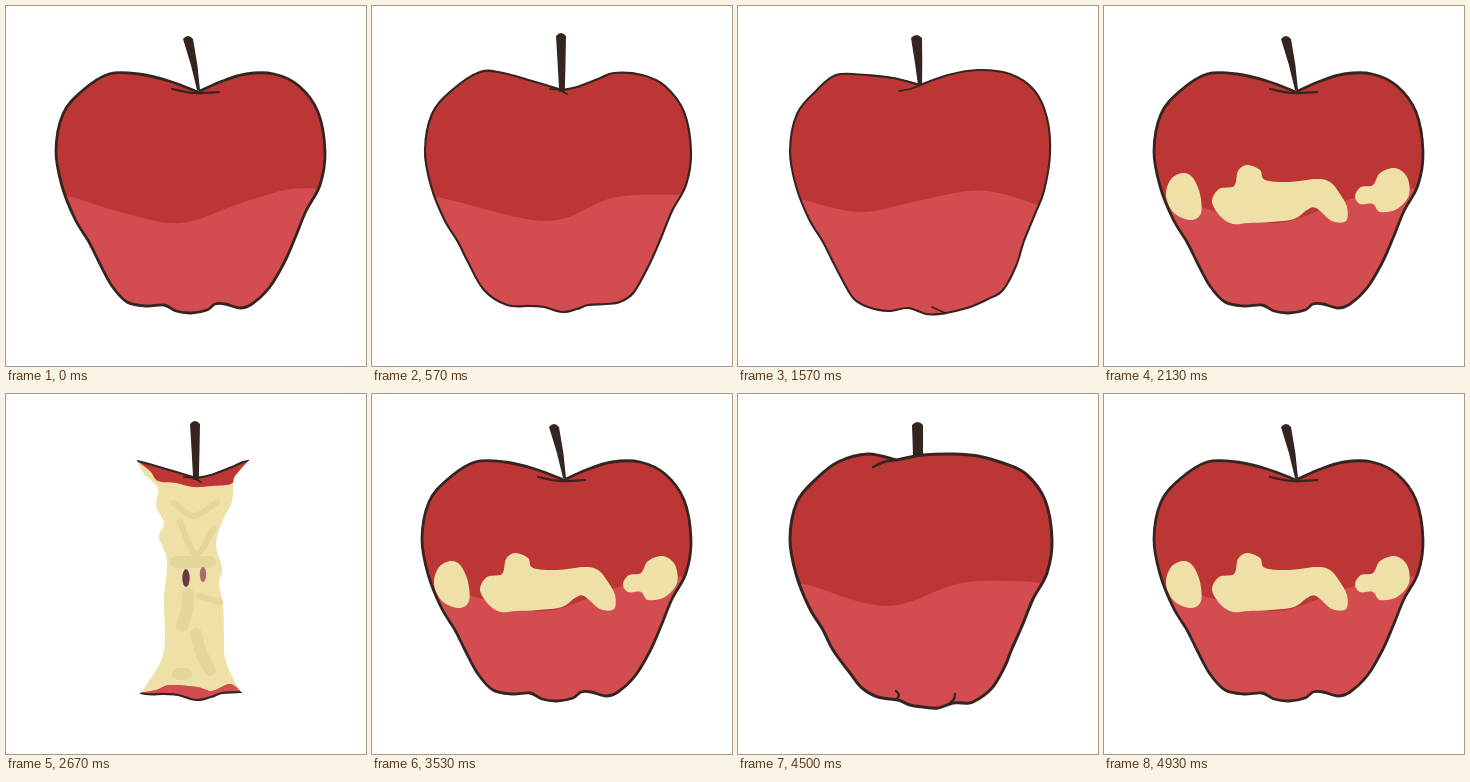
Animation of 360x360 px, one loop 5 s. Source, as an HTML page:

```html
<!DOCTYPE html>
<html lang="en">
<head>
<meta charset="utf-8">
<title>Apple</title>
<style>
html, body { margin: 0; width: 100%; height: 100%; overflow: hidden; background: #fff; }
svg { display: block; width: 100vw; height: 100vh; }
.pose { visibility: hidden; }
.pose.on { visibility: visible; }
.skin { fill: #bb3635; }
.light { fill: #d34c4f; }
.ink { fill: none; stroke: #35241f; stroke-linecap: round; stroke-linejoin: round; }
.stem { fill: #35241f; }
.flesh { fill: #efe0a7; }
.mark { fill: none; stroke: #e1d092; stroke-linecap: round; stroke-linejoin: round; }
.soft .mark { stroke: #e5d69b; }
</style>
</head>
<body>
<svg id="stage" viewBox="0 0 360 360"></svg>
<script>
const pts = s => s.split(' ').map(p => p.split(',').map(Number));
const shift = (list, dx) => list.map(([x, y]) => [x + dx, y]);

// Smooth path through points.
function curve(p, closed) {
  const n = p.length;
  const at = i => closed ? p[(i + n) % n] : p[Math.max(0, Math.min(n - 1, i))];
  const lean = (b, a, c, k) => b.map((v, j) => (v + k * (c[j] - a[j]) / 6).toFixed(2));
  let d = 'M' + p[0];
  for (let i = 0; i < (closed ? n : n - 1); i++) {
    const b = at(i), c = at(i + 1);
    d += `C${lean(b, at(i - 1), c, 1)} ${lean(c, b, at(i + 2), -1)} ${c}`;
  }
  return d + (closed ? 'Z' : '');
}
const onward = p => curve(p).replace('M', 'L');

// Uneven bite line from a to b, bowed to its left-hand side.
function ragged(ends, bow, amp, n) {
  const [a, b] = pts(ends);
  const dx = b[0] - a[0], dy = b[1] - a[1], len = Math.hypot(dx, dy);
  return Array.from({ length: n + 1 }, (_, i) => {
    const u = i / n, arch = Math.sin(Math.PI * u);
    const off = bow * arch + amp * Math.sin(i * 2.6) * Math.sqrt(Math.abs(arch));
    return [a[0] + dx * u - dy / len * off, a[1] + dy * u + dx / len * off];
  });
}

const path = (cls, d, width) =>
  `<path class="${cls}" d="${d}"${width ? ` stroke-width="${width}"` : ''}/>`;
const marks = (width, ...lines) =>
  lines.map(l => path('mark', curve(pts(l)), width)).join('');

let clips = 0;
function clipped(d, inner) {
  const id = 'clip' + clips++;
  return `<clipPath id="${id}"><path d="${d}"/></clipPath><g clip-path="url(#${id})">${inner}</g>`;
}

function stem(tip, tipW, base, baseW) {
  const [[x, y]] = pts(tip), [[u, v]] = pts(base), mid = (y + v) / 2, w = (tipW + baseW) / 2;
  const bend = x + (u - x) * .65;
  return path('stem', `M${x - tipW} ${y}Q${x} ${y - 6} ${x + tipW} ${y}` +
    `Q${bend + w} ${mid} ${u + baseW} ${v}H${u - baseW}Q${bend - w} ${mid} ${x - tipW} ${y}Z`);
}

const RIGHT = pts('293,80 312,106 319,146 314,179 300,205 289,232 278,257');
const LEFT = pts('93,256 83,236 69,213 56,180 50,145 57,108 76,85');

// Outline runs clockwise from the dip at the stem.
function apple({ from, foot, to, right = RIGHT, left = LEFT, wave, ink, lines, stalk }) {
  const body = curve([...pts(from), ...right, ...pts(foot), ...left, ...pts(to)]);
  const light = curve(pts(wave)) + 'V340H40Z';
  const skin = (inner = '') => path('skin', body) +
    clipped(body, path('light', light) + inner) + path('ink', body, ink) +
    lines.map(l => path('ink', curve(pts(l)), ink * .8)).join('');
  return { skin, stalk, dip: pts(from)[0] };
}

// What is left of an apple: two caps of skin on a ragged core.
function core(a, { top, bottom, left, right, detail }) {
  const cap = (edge, y) => `M${edge[0][0] - 1} ${y}${onward(edge)}H${edge[edge.length - 1][0] + 1}V${y}Z`;
  const flesh = curve(left) + onward([...right].reverse()) + `L${a.dip[0]} ${a.dip[1] + 3}Z`;
  return path('flesh', flesh) + detail +
    clipped(cap(top, 0) + cap(bottom, 360), a.skin()) + a.stalk;
}

const first = apple({
  from: '192,86 214,76 240,68 268,68',
  foot: '263,282 246,298 234,302 219,298 209,298 201,304 185,307 170,305 158,299 140,300 121,296 106,280',
  to: '103,68 133,68 163,75 192,86',
  wave: '40,188 62,190 118,207 175,217 235,197 285,183 330,184',
  ink: 2.8,
  lines: ['166,83 188,87 213,86'],
  stalk: stem('182,33', 5, '192.5,84', 1.5)
});

const second = apple({
  from: '182,79 210,69 240,64 272,68',
  right: pts('296,84 309,112 312,148 306,185 297,208 286,235 278,260'),
  foot: '265,284 250,293 232,301 213,306 202,308 188,308 170,302 150,305 130,301 116,293 106,277',
  left: shift(LEFT, 2),
  to: '98,69 128,69 155,72 182,79',
  wave: '40,186 66,194 122,206 175,196 230,185 265,188 300,199 330,206',
  ink: 2.1,
  lines: ['161,85 172,83 183,79', '128,69 155,72 182,79', '194,301 207,307'],
  stalk: stem('178.5,32', 5.5, '182,79', 2)
});

const third = apple({
  from: '158,66 185,61 215,60 240,62 265,69',
  right: shift(RIGHT, -5),
  foot: '267,272 254,294 235,308 225,309 215,309 200,314 185,313 172,311 160,306 140,303 124,294 112,279',
  left: shift(LEFT, 2),
  to: '100,68 130,60 158,66',
  wave: '40,188 70,191 150,212 230,188 330,190',
  ink: 3,
  lines: ['135,73 146,68 158,66', '158,297 161,301 158,306', '217,300 216,305 212,309'],
  stalk: stem('179.5,31', 5.5, '180,62', 5)
});

const fourth = apple({
  from: '184,82 206,74 240,67 270,70',
  right: shift(RIGHT, -2),
  foot: '268,276 252,298 230,306 206,307 195,310 180,310 168,307 150,304 128,302 110,284',
  left: shift(LEFT, 3),
  to: '104,70 130,67 160,74 184,82',
  wave: '40,190 70,193 165,212 240,190 330,190',
  ink: 2.4,
  lines: ['168,84 180,86 190,82'],
  stalk: stem('183,32', 5, '185,83', 2)
});

const fifth = apple({
  from: '190,84 205,81 226,73 242,67 270,69',
  foot: '262,286 248,296 234,298 216,299 205,303 190,306 172,301 158,300 135,299 112,284',
  left: shift(LEFT, 3),
  to: '108,66 131,67 160,75 190,84',
  wave: '40,190 70,192 175,215 245,191 330,189',
  ink: 2.2,
  lines: ['178,83 187,84 195,88'],
  stalk: stem('189,30', 5, '190,86', 2.8)
});

const nibbles = [
  '62,186 68,172 80,167 89,172 96,188 97,207 88,214 74,210 65,200',
  '108,196 115,183 130,180 134,165 143,159 156,164 161,174 185,176 212,173 226,176 236,188 243,201 242,215 228,215 212,202 203,204 190,213 166,216 144,217 129,218 117,211',
  '251,190 257,181 269,179 276,167 291,162 303,171 305,189 293,203 276,206 269,198 256,198'
].map(s => path('flesh', curve(pts(s), true))).join('');

const belt = core(second, {
  top: ragged('54,130 312,136', 8, 5, 13),
  bottom: ragged('88,241 287,239', -6, 5, 11),
  left: ragged('54,130 88,241', -8, 5, 8),
  right: ragged('312,136 287,239', 8, 5, 8),
  detail: marks(8, '112,166 126,172 140,184', '172,172 176,188 184,206', '226,166 216,186 204,204')
});

const half = core(third, {
  top: pts('79,83 101,89 112,102 130,102 155,112 181,110 206,111 217,103 240,96 262,94 285,83'),
  bottom: pts('111,277 135,277 152,271 168,263 187,267 207,262 230,264 249,270 268,270'),
  left: pts('79,83 83,96 99,108 101,122 111,135 108,148 115,160 109,176 110,199 121,209 123,230 126,250 119,268 117,279'),
  right: pts('285,83 275,99 268,110 270,125 261,145 267,163 261,182 253,195 253,222 262,241 268,262 267,272'),
  detail:
    marks(9, '126,124 138,138 156,150', '131,157 134,178', '172,146 181,168 186,198',
      '155,203 148,221 139,230 151,228', '266,99 254,104 241,124 235,143') +
    marks(11, '205,196 194,218 190,238', '212,198 229,216 250,229', '232,181 239,189') +
    marks(5, '202,153 199,165', '212,160 208,180 204,196', '166,142 176,158')
});

const narrow = core(fourth, {
  top: ragged('106,71 256,70', 28, 3, 9),
  bottom: ragged('113,287 257,287', -8, 4, 8),
  left: ragged('106,71 113,287', -32, 4, 13),
  right: ragged('256,70 257,287', 20, 4, 13),
  detail: marks(8, '152,116 164,126 174,140', '216,114 204,132 196,150',
    '160,170 160,190 163,210', '206,182 208,200 218,216', '184,224 176,242 172,258')
});

const thin = core(fifth, {
  top: pts('131,67 144,77 152,87 170,89 187,93 206,92 225,90 229,82 242,67'),
  bottom: pts('134,299 150,296 164,291 191,293 206,297 224,290 235,298'),
  left: pts('131,67 138,80 152,94 150,112 158,129 153,143 161,167 158,206 159,243 156,264 147,281 135,299'),
  right: pts('242,67 229,84 226,108 218,124 210,150 216,174 213,190 217,210 218,244 219,264 227,284 235,298'),
  detail: '<g class="soft">' +
    marks(6, '168,109 188,122 211,108', '174,128 190,160 208,134', '193,202 214,208') +
    marks(12, '170,168 204,168', '182,200 181,216 176,232', '172,280 180,280', '190,240 195,258 204,276') +
    '</g><ellipse cx="180" cy="184" rx="3.7" ry="9" fill="#6a3a43"/>' +
    '<ellipse cx="197" cy="180.5" rx="3.2" ry="7.5" fill="#a36d6b"/>'
});

const whole = [first, second, third, fourth, fifth].map(a => a.skin() + a.stalk);
const drawings = [...whole, first.skin(nibbles) + first.stalk, belt, half, narrow, thin];

const stage = document.getElementById('stage');
stage.innerHTML = drawings.map(d => `<g class="pose">${d}</g>`).join('');
const poses = [...stage.children];

// Whole for five drawings, then eaten over five.
const LOOP = 5000, LEAD = 30, HALF = 700;
const steps = [0, 140, 270, 400, 540];

function poseAt(ms) {
  const t = ms % LOOP - LEAD;
  if (t < 0) return 0;
  const step = steps.filter(s => s <= t % HALF).length - 1;
  return Math.floor(t / HALF) % 2 * 5 + step;
}

let shown = -1;
function tick() {
  const next = poseAt(performance.now());
  if (next !== shown) {
    poses.forEach((p, i) => p.classList.toggle('on', i === next));
    shown = next;
  }
  requestAnimationFrame(tick);
}
tick();
</script>
</body>
</html>
```
